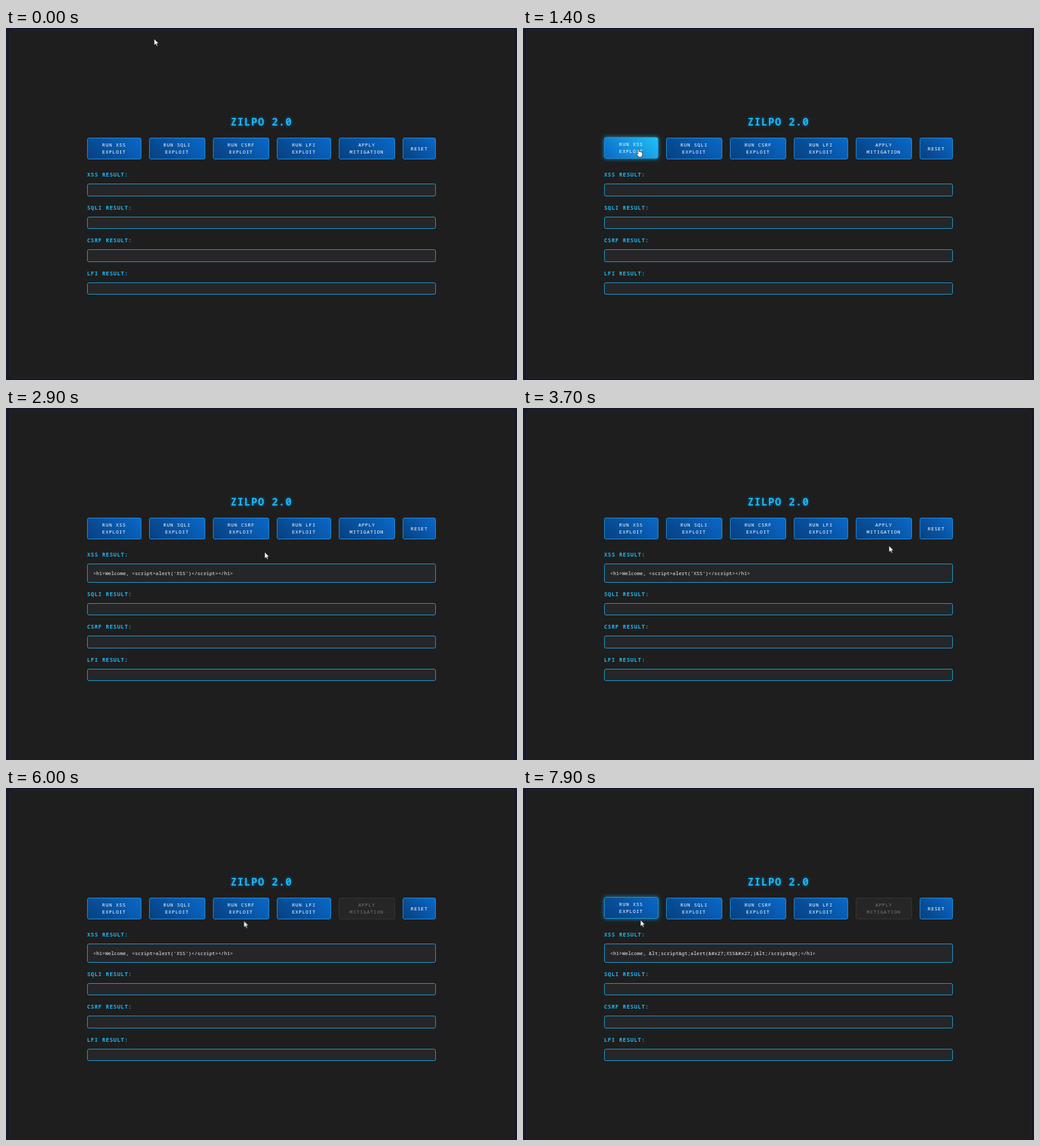
These frames come from a looping animation (800 by 552 pixels, 8 s). An HTML page:

```html
<!DOCTYPE html>
<html lang="en">
<head>
<meta charset="utf-8">
<title>ZILPO 2.0</title>
<style>
:root { --cyan: #1eb6f3; --line: #1f9bd0; --loop: 8s infinite; }
* { box-sizing: border-box; }
html, body { margin: 0; width: 100%; height: 100%; overflow: hidden; background: #161a26; }
body { position: relative; font-family: "Noto Sans Mono", "DejaVu Sans Mono", monospace; }

.panel {
  position: absolute; left: 5px; top: 3px; width: 791px; height: 546px;
  background: #1e1e1e; border: 1px solid #20243a; border-radius: 4px;
  animation: panel var(--loop) step-end;
}
h1 {
  position: absolute; left: 0; top: 135px; width: 800px; margin: 0;
  font-size: 16px; line-height: 24px; font-weight: 700; letter-spacing: 1.15px;
  text-align: center; color: var(--cyan); text-shadow: 0 0 4px rgba(0, 150, 230, .75);
}

.buttons {
  position: absolute; left: 127px; top: 171.5px; display: grid; gap: 12px;
  grid-template-columns: 84.5px 88.3px 88.3px 84.5px 88.3px 52.1px;
}
button {
  position: relative; isolation: isolate; height: 34.5px; padding: 0;
  border: 1px solid #1e90d8; border-radius: 3px;
  background: linear-gradient(45deg, #064080, #0a68c8);
  color: #fff; font: 500 7.6px/10.3px "Noto Sans Mono", "DejaVu Sans Mono", monospace;
  letter-spacing: .77px;
}
button::before {
  content: ""; position: absolute; inset: 0; z-index: -1; border-radius: 2px; opacity: 0;
  background: linear-gradient(45deg, #0a68c8, #20c0f5);
}
.xss { animation: xss-lift var(--loop) linear; }
.xss::before { animation: xss-lit var(--loop) step-end; }
.apply { animation: apply-lift var(--loop) linear, disable var(--loop) step-end; }
.apply::before { animation: apply-lit var(--loop) step-end; }

.results { position: absolute; left: 127px; top: 223px; width: 546px; }
.label {
  height: 14px; margin-bottom: 7px; font-size: 8.5px; line-height: 14px; font-weight: 700;
  letter-spacing: .77px; color: var(--cyan);
}
.box {
  position: relative; height: 19.5px; margin-bottom: 11px;
  background: #262628; border: 1px solid var(--line); border-radius: 3px;
}
.first { animation: grow var(--loop) step-end; }
.first span {
  position: absolute; left: 8.5px; top: 8px; font-size: 7.78px; line-height: 12px;
  color: #f0f0f0; white-space: pre; opacity: 0;
}
.raw { animation: raw var(--loop) step-end; }
.safe { animation: safe var(--loop) step-end; }

svg { position: absolute; left: 0; top: 0; width: 800px; height: 552px; }
.cursor { animation: move var(--loop) linear; }
.arrow { animation: arrow var(--loop) step-end; }
.hand { animation: hand var(--loop) step-end; }
.ban { animation: ban var(--loop) step-end; }

@keyframes panel { 0% { height: 546px } 21.25%, 100% { height: 556.3px } }
@keyframes grow { 0% { height: 19.5px } 21.25%, 100% { height: 29.8px } }
@keyframes raw { 0% { opacity: 0 } 21.25% { opacity: 1 } 90%, 100% { opacity: 0 } }
@keyframes safe { 0% { opacity: 0 } 90%, 100% { opacity: 1 } }

@keyframes xss-lift {
  0%, 8.75%, 30%, 78.75% { transform: none; box-shadow: 0 0 0 rgba(30, 190, 245, 0) }
  11.25%, 26.25%, 82.5%, 100% { transform: translateY(-1px); box-shadow: 0 0 6px rgba(30, 190, 245, .7) }
}
@keyframes apply-lift {
  0%, 47.5%, 60%, 100% { transform: none; box-shadow: 0 0 0 rgba(30, 190, 245, 0) }
  51.25%, 56.25% { transform: translateY(-1px); box-shadow: 0 0 6px rgba(30, 190, 245, .7) }
}
@keyframes xss-lit {
  0%, 26.25%, 98.75%, 100% { opacity: 0 }
  10%, 80% { opacity: 1 }
}
@keyframes apply-lit { 0%, 56.25%, 100% { opacity: 0 } 48.75% { opacity: 1 } }
@keyframes disable {
  56.25%, 100% { background: #262626; border-color: #353535; color: #777 }
}

/* The pointer advances ten times a second. */
@keyframes move {
  0% { transform: translate(232px, 17px); animation-timing-function: steps(3) }
  3.75% { transform: translate(226px, 50px); animation-timing-function: steps(4) }
  8.75% { transform: translate(192px, 160px); animation-timing-function: steps(3) }
  12.5%, 23.75% { transform: translate(181px, 189px); animation-timing-function: steps(4) }
  28.75% { transform: translate(262px, 212px); animation-timing-function: steps(6) }
  36.25% { transform: translate(405px, 226px); animation-timing-function: steps(4) }
  41.25% { transform: translate(470px, 226px); animation-timing-function: steps(4) }
  46.25% { transform: translate(573px, 216px); animation-timing-function: steps(3) }
  50%, 67.5% { transform: translate(587px, 191px); animation-timing-function: steps(3) }
  71.25% { transform: translate(530px, 208px); animation-timing-function: steps(6) }
  78.75% { transform: translate(215px, 209px); animation-timing-function: steps(2) }
  81.25% { transform: translate(172px, 198px); animation-timing-function: steps(2) }
  83.75%, 95% { transform: translate(168px, 195px); animation-timing-function: steps(3) }
  98.75%, 100% { transform: translate(184px, 207px) }
}
@keyframes arrow {
  0%, 26.25%, 71.25%, 98.75%, 100% { opacity: 1 }
  10%, 48.75%, 80% { opacity: 0 }
}
@keyframes hand {
  0%, 26.25%, 56.25%, 98.75%, 100% { opacity: 0 }
  10%, 48.75%, 80% { opacity: 1 }
}
@keyframes ban { 0%, 71.25%, 100% { opacity: 0 } 56.25% { opacity: 1 } }
</style>
</head>
<body>
<div class="panel"></div>
<h1>ZILPO 2.0</h1>

<div class="buttons">
  <button class="xss">RUN XSS<br>EXPLOIT</button>
  <button>RUN SQLI<br>EXPLOIT</button>
  <button>RUN CSRF<br>EXPLOIT</button>
  <button>RUN LFI<br>EXPLOIT</button>
  <button class="apply">APPLY<br>MITIGATION</button>
  <button>RESET</button>
</div>

<div class="results">
  <div class="label">XSS RESULT:</div>
  <div class="box first">
    <span class="raw">&lt;h1&gt;Welcome, &lt;script&gt;alert('XSS')&lt;/script&gt;&lt;/h1&gt;</span>
    <span class="safe">&lt;h1&gt;Welcome, &amp;lt;script&amp;gt;alert(&amp;#x27;XSS&amp;#x27;)&amp;lt;/script&amp;gt;&lt;/h1&gt;</span>
  </div>
  <div class="label">SQLI RESULT:</div>
  <div class="box"></div>
  <div class="label">CSRF RESULT:</div>
  <div class="box"></div>
  <div class="label">LFI RESULT:</div>
  <div class="box"></div>
</div>

<svg viewBox="0 0 800 552">
  <g class="cursor" stroke-linejoin="round">
    <path class="arrow" fill="#fff" stroke="#111" stroke-width=".6"
      d="M0 0V10L2.3 7.9L3.9 11.4L5.4 10.7L3.9 7.3H7Z"/>
    <path class="hand" fill="#fff" stroke="#111" stroke-width=".7"
      d="M-1 1Q0 -.6 1 1V5Q2 4.2 2.8 5.3Q3.9 4.6 4.5 5.8Q6 5.4 6 7V10Q5.6 11.5 5 12.3V13.6H-.6V12.3L-3.4 8.3Q-3.4 6.6 -1 8.4Z"/>
    <g class="ban">
      <circle r="4.8" fill="#a19d95" stroke="#55534f" stroke-width=".7"/>
      <circle r="2.9" fill="#77746e"/>
      <path d="M-2.7 -2.7L2.7 2.7" stroke="#333" stroke-width="2.6"/>
      <path d="M-2.7 -2.7L2.7 2.7" stroke="#eee" stroke-width="1.5"/>
    </g>
  </g>
</svg>
</body>
</html>
```
